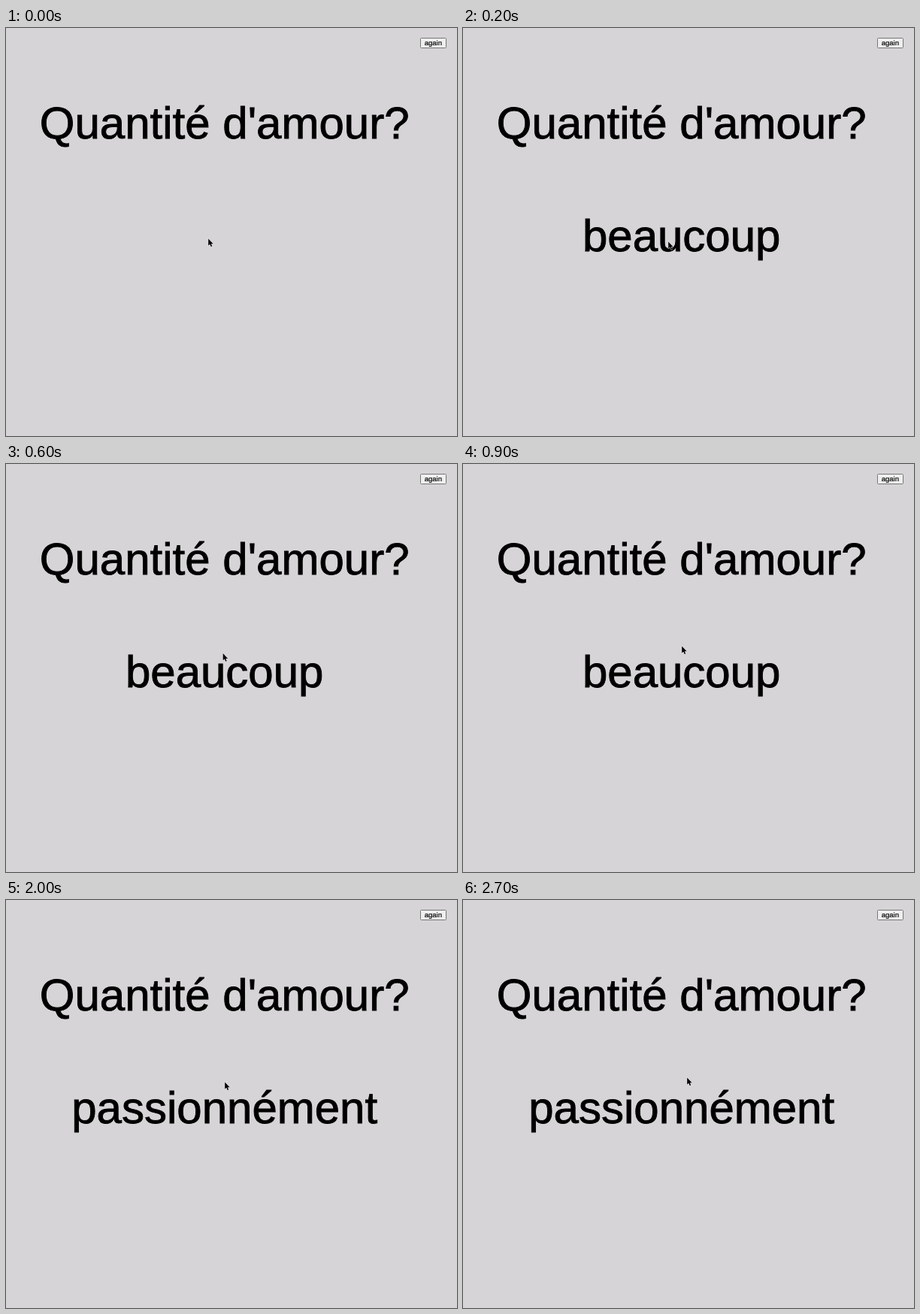
An HTML page that plays this animation: 600 px wide and 543 px high, repeating every 2800 ms.

```html
<!DOCTYPE html>
<html lang="fr">
<head>
<meta charset="utf-8">
<title>Quantité d'amour?</title>
<style>
  html, body { margin: 0; width: 100%; height: 100%; overflow: hidden; background: #d6d4d6; }
  svg { display: block; width: 600px; height: 543px; }
  text { font-family: "Liberation Sans", Helvetica, Arial, sans-serif; text-anchor: middle; fill: #000; stroke: #000; }
  .big { font-size: 60px; stroke-width: 0.9px; }
  .label { font-size: 9.5px; stroke-width: 0.2px; }
</style>
</head>
<body>
<svg viewBox="0 0 600 543">
  <rect x="551.5" y="13.5" width="34" height="13" rx="1" fill="#efefef" stroke="#767676"/>
  <text class="label" x="568.4" y="23.2">again</text>
  <text class="big" x="290.7" y="147">Quantité d'amour?</text>
  <text class="big" id="answer" x="290.7" y="297"></text>
  <path id="pointer" d="M0 0V9.2L2.1 7.3L3.5 10.7L5 10.1L3.6 6.8H6.4Z"
    fill="#000" stroke="#e8e6e8" stroke-width="1" paint-order="stroke"/>
</svg>
<script>
  const LOOP = 2800, TICK = 100;

  // The pointer rests at each point until the next; "glide" eases out towards it.
  const path = [
    { at: 0, x: 269, y: 280 },
    { at: 100, x: 273, y: 284 },
    { at: 400, x: 284, y: 269, glide: true },
    { at: 900, x: 291, y: 242 },
    { at: 2400, x: 284, y: 241 },
    { at: 2700, x: 298, y: 236 }
  ];

  const answer = document.getElementById("answer");
  const pointer = document.getElementById("pointer");
  const easeOut = p => 1 - (1 - p) ** 2;
  const mix = (a, b, p) => a + (b - a) * p;

  function wordAt(t) {
    if (t < 100) return "";
    return t < 1000 ? "beaucoup" : "passionnément";
  }

  function pointAt(t) {
    const i = path.findLastIndex(key => key.at <= t);
    const from = path[i], to = path[i + 1];
    if (!from.glide) return from;
    const p = easeOut((t - from.at) / (to.at - from.at));
    return { x: mix(from.x, to.x, p), y: mix(from.y, to.y, p) };
  }

  function draw(now) {
    const elapsed = Math.max(0, now - begin) % LOOP;
    const t = Math.floor(elapsed / TICK) * TICK;
    const word = wordAt(t);
    const { x, y } = pointAt(t);
    if (answer.textContent !== word) answer.textContent = word;
    pointer.setAttribute("transform", `translate(${x + 0.2} ${y + 0.4})`);
    requestAnimationFrame(draw);
  }

  const begin = performance.now();
  draw(begin);
</script>
</body>
</html>
```
